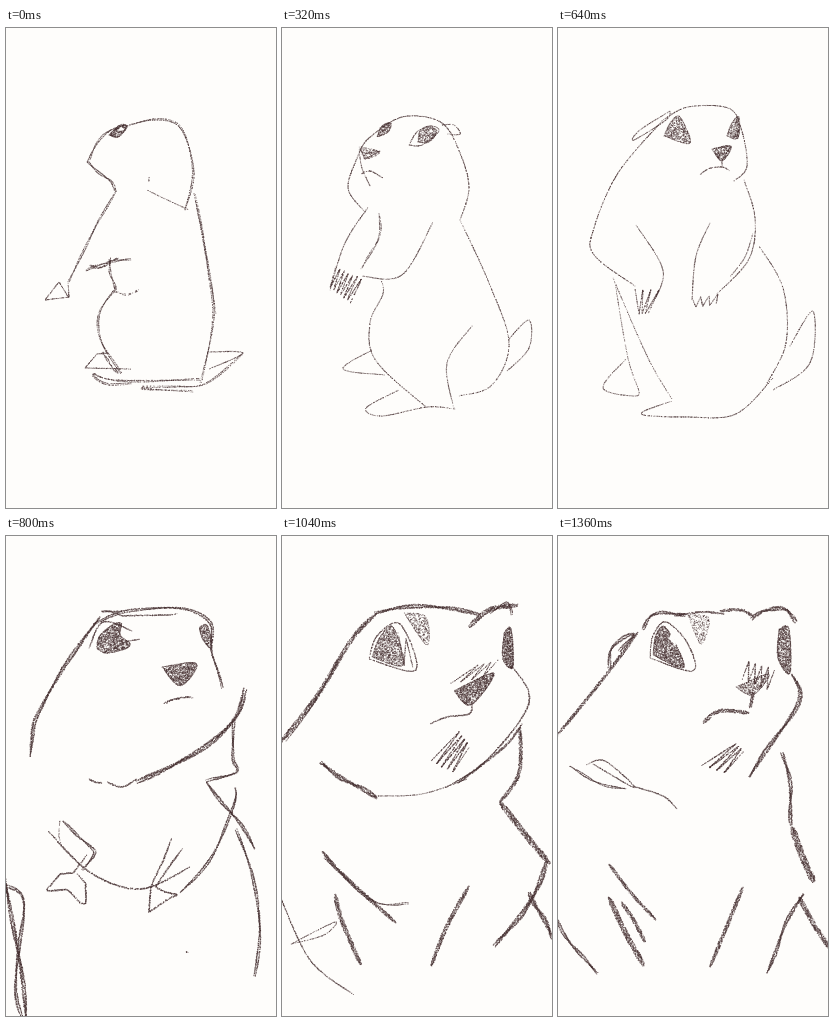
An HTML page with a canvas that plays this animation: 270x480 px, repeating every 1.44 s.

```html
<!DOCTYPE html>
<html lang="en">
<head>
<meta charset="utf-8">
<title>Prairie dog turns</title>
<style>
html, body { margin: 0; height: 100%; overflow: hidden; background: #fefdfb; }
canvas { display: block; width: 100vw; height: 100vh; }
</style>
</head>
<body>
<canvas id="stage" width="270" height="480"></canvas>
<script>
const PAPER = '#fefdfb', INK = '#452f30';
const STEP = 80, STEPS = 18, SAMPLES = 90;
const CLOSED = 'ofw';

const stage = document.getElementById('stage');
const ctx = stage.getContext('2d');

// Each stroke: a tag, then a few x,y points.
// s smooth, d smooth drawn twice, l straight, o closed outline (number = width);
// f shaded shape (number = density), w blank shape;
// z zigzag between two edges, given as start and end of each (width/turns).
const profile = {
  head: 'd.9 119,98 150,92 175,101 188,145 179,182',
  face: 'd1 121,97 105,102 91,116 81,134',
  mouth: 'd1.2 81,134 88,140 104,153 109,164',
  eyeR: 'f1.9 103,107 114,97 121,99 112,109',
  glint: 'w1 112,103 115,99 118,102',
  armL: 'd.9 110,163 93,191 80,220 62,254',
  pawL: 'l1 62,255 63,270 53,254 39,272 63,269',
  collar: 's.6 139,161 155,169 183,182',
  mark: 's.6 143,145 143,154',
  back: 'd.8 188,165 201,235 208,290 194,355',
  back2: 's.8 190,174 203,240 210,287',
  armR: 'd1 80,243 105,233 125,232',
  fold: 'd1 84,237 97,239 112,229',
  fold2: 'd1 103,230 105,245 109,262',
  belly: 'd.9 110,259 94,285 96,315 115,346',
  smudge: 'd.4 105,263 120,266 133,263',
  footL: 'l1 102,325 91,326 79,340 125,341',
  toe: 'd1 97,324 102,334 113,345',
  sole: 'd.9 125,355 100,355 87,346 110,352 194,352',
  hem: 'd.7 187,364 135,360 170,359 200,355 236,326',
  tail: 's1 201,324 237,325 203,341'
};
const left = {
  head: 's1 98,100 125,88 160,95 178,125 187,160 178,192',
  face: 's1 108,94 85,112 76,128 66,160 82,183',
  face2: 's.8 77,121 80,140 88,158',
  eyeL: 'f1.4 95,109 100,98 109,95 106,104',
  eyeR: 'f1.2 136,114 138,103 146,99 155,103 147,114',
  lid: 'o.9 127,117 135,104 148,98 157,103 140,117',
  glint: 'w1 147,104 149,101 151,104',
  ear: 's.8 160,97 172,97 178,106 165,106',
  nose: 'f.7 79,119 83,131 98,124',
  stem: 'l1 77,118 83,131 98,123 81,126',
  mouth: 's1.1 79,146 88,143 101,150',
  armL: 's.9 87,178 63,215 48,262',
  armIn: 'd.8 97,185 96,212 79,241',
  pawL: 'z1/7 54,238 80,250 48,260 68,276',
  armR: 's.8 80,248 120,247 151,194',
  belly: 's.8 99,252 101,266 88,295 94,333 144,379',
  back: 's.8 178,192 207,255 227,315 210,357 177,368',
  thigh: 's.8 190,298 165,335 172,381',
  footL: 's.8 90,322 61,341 103,347',
  foot: 's.8 117,362 84,380 100,388 145,379 173,381',
  tail: 's.8 226,312 247,292 247,320 224,344'
};
const right = {
  head: 's.9 105,92 130,79 170,80 183,100 189,138 176,153',
  face: 's.9 105,92 60,145 36,200 36,227 77,258',
  ear: 'o.9 112,83 82,102 76,112 108,92',
  eyeL: 'f1.1 106,108 113,94 122,89 132,115',
  eyeR: 'f1.3 169,108 174,95 181,89 180,110',
  nose: 'f1.3 154,121 173,118 164,133',
  stem: 'l.9 154,121 173,118 164,133 164,140',
  mouth: 's1.1 142,147 150,141 164,139 172,143',
  side: 's.9 186,152 197,190 191,231 159,266',
  side2: 's.7 195,205 187,229 172,249',
  armR: 's.9 134,272 138,228 152,195',
  armIn: 's.9 78,197 105,242 95,275',
  pawL: 'z.9/4 77,260 101,262 81,286 90,286',
  pawR: 'z.9/4 134,270 160,266 138,279 158,277',
  flank: 's.5 57,255 70,330 81,362',
  belly: 's.6 55,250 90,330 114,371',
  footL: 's.7 68,331 45,360 78,368 80,360',
  foot: 's.9 114,373 83,386 130,389 178,386 215,350',
  back: 's.8 201,218 225,260 228,315 208,357',
  tail: 's.8 232,318 255,283 252,335 215,362'
};
const close = {
  head: 'd2 78,86 115,72 180,69 214,80 214,113 238,152',
  ear: 's1.8 118,71 95,67 130,63 201,75',
  face: 'd3 88,75 65,115 35,155 -2,202',
  eyeL: 'f1.8 83,115 86,100 110,84 107,98 120,107 95,120',
  lidL: 's1.6 83,112 97,86 126,95',
  lash: 's1 108,113 120,106 135,103',
  eyeR: 'f1.6 205,82 216,84 217,120 206,102',
  nose: 'f1.8 157,136 196,131 197,142 178,158',
  mouth: 's2.5 166,178 180,174 195,171',
  jawR: 'd3 238,152 228,183 195,215 130,245',
  jawL: 's1.8 83,243 89,246 96,247',
  chin: 's1.8 101,246 116,251 131,243',
  neck: 'd1.8 229,184 226,222 230,236 200,246',
  shoulder: 'd2 200,246 230,283 249,313',
  side: 'd2 250,301 247,317 205,375 182,402',
  back: 'd2.2 243,331 263,400 268,482',
  chest: 's1.8 42,295 85,337 135,353 184,331',
  faint: 's.5 54,283 53,300 57,314',
  armIn: 'd2 46,329 60,341 82,350 66,363',
  pawL: 'l2.2 83,348 19,389 75,411 62,364',
  edge: 'd2.5 -2,342 10,400 20,482',
  edge2: 'd2 -2,350 18,368 9,450 15,482',
  pawR: 'l2.2 182,317 146,390 141,427 182,402 147,390 186,330',
  speck: 's2.4 180,416 182,417'
};
const near = {
  head: 'd2.5 93,78 135,69 198,79',
  ear: 's5 187,91 207,74 236,69',
  earTip: 'd1.2 208,78 225,66 229,79',
  face: 's4.6 95,77 70,103 35,160 -2,207',
  cheek: 's1.3 56,125 30,170 4,205',
  eyeL: 'f1.2 90,121 98,101 111,91 121,129',
  lidL: 'o1.2 87,123 95,100 118,88 134,134',
  lash: 'l1 116,96 122,130 124,102 131,132',
  brow: 'f.7 122,77 144,81 145,109',
  eyeR: 'f1.9 222,97 229,93 231,131 221,123',
  nose: 'f1.7 172,155 212,137 189,169',
  tuft: 'z.9/4 168,148 200,142 196,129 216,124',
  mouth: 's1.6 148,188 165,181 187,178 190,168',
  chin: 'z1.3/5 149,225 170,237 178,195 188,210',
  jawR: 's1.6 230,130 247,167 205,224 163,252',
  jawR2: 's2.5 240,188 222,211 176,247',
  jawL: 'd3 38,227 58,240 95,263',
  under: 's.8 92,260 140,258 185,243',
  neck: 's4 238,191 237,237 218,266',
  shoulder: 's6 218,266 246,302 268,328',
  side: 'd3 266,325 254,356 213,411',
  back: 'd3 248,356 258,378 272,402',
  chest: 's4 40,315 60,338 114,387',
  chest2: 'd1 42,322 92,365 127,368',
  armIn: 's4.5 53,358 60,385 79,429',
  edge: 's1.3 -2,360 28,424 72,459',
  leaf: 'o.8 9,408 53,386 42,399',
  pawR: 's4.2 187,350 165,390 149,430'
};
const up = {
  head: 's4 121,78 150,75 197,81',
  ear: 'd2.6 194,84 208,74 226,72 237,87',
  earL: 'd2 84,93 95,79 127,78',
  face: 's4.2 91,90 55,130 -2,198',
  cheek: 'd1.4 55,108 74,100 88,91',
  eyeL: 'f1.7 95,119 98,99 108,92 126,131',
  glint: 'w1 111,103 114,97 118,109',
  lidL: 'o1.3 92,122 95,100 108,86 130,108 135,135',
  brow: 'f.8 128,79 151,82 146,109',
  eyeR: 'f1.6 221,93 231,93 232,137 220,122',
  nose: 'f.8 181,145 191,125 216,130 197,157',
  tuft: 'z1.2/5 184,144 209,154 191,125 217,133',
  stem: 's3.5 195,156 194,163 192,172',
  mouth: 's4.4 136,187 155,178 191,175',
  chin: 'z2/4 146,232 170,238 178,208 186,212',
  jawR: 's4 235,140 235,190 192,248',
  jawL: 'd1.2 12,230 35,245 68,253',
  jaw2: 'd1.5 35,228 56,242 98,268',
  under: 's1.4 43,224 67,240 123,278',
  neck: 'd3 222,212 235,270 240,290',
  shoulder: 's6.5 235,286 249,309 267,348',
  side: 'd2.4 258,345 220,400 203,440',
  back: 's5 249,368 257,386 272,412',
  chest: 'd1.1 50,325 75,357 109,386',
  armIn: 's5 54,358 62,390 80,430',
  edge: 's4 -2,374 15,401 42,433',
  pawR: 'd1.4 186,342 170,380 143,446'
};
const stare = {
  ...up,
  head: 's2.2 116,80 145,76 166,78',
  crown: 's3.2 162,75 183,74 196,81',
  face: 's3.4 80,96 48,139 -2,201',
  cheek: 'd2 50,132 54,112 76,98 62,116',
  brow: 'f.5 130,79 151,82 143,108',
  nose: 'f1 178,151 211,138 195,159',
  mouth: 's4 145,187 162,175 191,177',
  chin: 'z1.4/4 143,230 166,237 179,207 186,215',
  jawR: 'd2.7 234,138 239,168 191,241',
  jaw2: 's1.2 28,229 47,225 77,252 35,228',
  under: 's1.4 74,250 105,260 119,273',
  neck: 'd2.4 225,216 231,245 234,290',
  shoulder: 's7 234,291 243,317 256,346',
  side: 'd2.2 245,358 225,395 209,437',
  back: 's5 241,361 255,387 272,413',
  chest: 's3.4 51,328 73,357 98,384',
  armIn: 's5.5 51,361 66,394 86,430',
  armIn2: 's4 63,366 75,383 87,406',
  edge: 'd2 -2,381 15,411 40,437',
  pawR: 's4 185,351 169,390 152,431'
};

const mix = (a, b, k) => a + (b - a) * k;
const mixPoint = (p, q, k) => [mix(p[0], q[0], k), mix(p[1], q[1], k)];

function smooth(pts) {
  const out = [pts[0]], last = pts.length - 1;
  for (let i = 0; i < last; i++) {
    const [a, b, c, d] = [pts[Math.max(0, i - 1)], pts[i], pts[i + 1], pts[Math.min(last, i + 2)]];
    for (let t = .1; t < 1.01; t += .1) {
      out.push([0, 1].map(n => b[n] + t / 2 * (c[n] - a[n] +
        t * (2 * a[n] - 5 * b[n] + 4 * c[n] - d[n] + t * (3 * (b[n] - c[n]) + d[n] - a[n])))));
    }
  }
  return out;
}

function zigzag([a, b, c, d], turns) {
  const out = [];
  for (let i = 0; i < turns; i++) {
    const k = i / (turns - 1);
    out.push(mixPoint(a, b, k), mixPoint(c, d, k));
  }
  return out;
}

// Even spacing lets any two strokes blend point by point.
function resample(pts) {
  const dist = [0];
  for (let i = 1; i < pts.length; i++) {
    dist.push(dist[i - 1] + Math.hypot(pts[i][0] - pts[i - 1][0], pts[i][1] - pts[i - 1][1]));
  }
  const total = dist[dist.length - 1], out = [];
  for (let n = 0, i = 1; n <= SAMPLES; n++) {
    const d = total * n / SAMPLES;
    while (i < pts.length - 1 && dist[i] < d) i++;
    const k = Math.min(1, (d - dist[i - 1]) / (dist[i] - dist[i - 1] || 1));
    out.push(mixPoint(pts[i - 1], pts[i], k));
  }
  return out;
}

function parse(spec) {
  const [tag, ...rest] = spec.split(' ');
  const kind = tag[0], [size, turns] = tag.slice(1).split('/').map(Number);
  let pts = rest.map(p => p.split(',').map(Number));
  if (CLOSED.includes(kind)) pts.push(pts[0]);
  if (kind === 'z') pts = zigzag(pts, turns);
  else if (kind !== 'l') pts = smooth(pts);
  return { kind, size, pts: resample(pts) };
}

function seeded(seed) {
  return () => {
    seed = seed + 0x6D2B79F5 | 0;
    let t = Math.imul(seed ^ seed >>> 15, 1 | seed);
    t = t + Math.imul(t ^ t >>> 7, 61 | t) ^ t;
    return ((t ^ t >>> 14) >>> 0) / 4294967296;
  };
}

function dot(x, y, rnd) {
  ctx.globalAlpha = .4 + .45 * rnd();
  ctx.fillRect(x - .45, y - .45, .9, .9);
}

function pencil(pts, width, rnd, sway = 0) {
  const phase = rnd() * 6;
  for (let i = 1; i < pts.length; i++) {
    const [x0, y0] = pts[i - 1], dx = pts[i][0] - x0, dy = pts[i][1] - y0;
    const len = Math.hypot(dx, dy) || 1;
    const u = i / pts.length;
    const w = width * Math.min(1, .45 + 6 * Math.min(u, 1 - u));
    const bend = sway * Math.sin(phase + u * 7);
    const press = .85 + .2 * Math.sin(phase + u * 23);
    for (let n = len * 2 * w * press + rnd(); n >= 1; n--) {
      const k = rnd(), off = bend + (rnd() - .5) * Math.max(.4, w - .5);
      dot(x0 + dx * k - dy / len * off, y0 + dy * k + dx / len * off, rnd);
    }
  }
}

function shade(pts, density, blank, rnd) {
  const shape = new Path2D();
  pts.forEach(([x, y]) => shape.lineTo(x, y));
  if (blank) {
    ctx.globalAlpha = 1;
    ctx.fillStyle = PAPER;
    ctx.fill(shape);
    ctx.fillStyle = INK;
    return;
  }
  const xs = pts.map(p => p[0]), ys = pts.map(p => p[1]);
  const x = Math.min(...xs), y = Math.min(...ys);
  const w = Math.max(...xs) - x, h = Math.max(...ys) - y;
  ctx.save();
  ctx.clip(shape);
  for (let n = w * h * density; n > 0; n--) dot(x + rnd() * w, y + rnd() * h, rnd);
  ctx.restore();
  pencil(pts, density * .6, rnd);
}

function drawStroke({ kind, size, pts }, rnd) {
  if (kind === 'f' || kind === 'w') return shade(pts, size, kind === 'w', rnd);
  pencil(pts, size, rnd);
  if (kind === 'd') pencil(pts, size * .8, rnd, 1 + size * .6);
}

// A stroke found in only one pose stays with the nearer one.
function blend(a, b, k) {
  if (!a || !b) return k < .5 ? a : b;
  return {
    kind: (k < .5 ? a : b).kind,
    size: mix(a.size, b.size, k),
    pts: a.pts.map((p, i) => mixPoint(p, b.pts[i], k))
  };
}

const keys = [[1, profile], [4, left], [8, right], [11, close], [13, near], [15, up], [17, stare]]
  .map(([at, pose]) => ({
    at,
    pose: Object.fromEntries(Object.entries(pose).map(([name, spec]) => [name, parse(spec)]))
  }));

function draw(step) {
  const at = Math.max(step, 1);
  const next = keys.findIndex((key, i) => i && key.at >= at);
  const a = keys[next - 1], b = keys[next];
  const k = (at - a.at) / (b.at - a.at);
  const rnd = seeded(at * 977);
  ctx.globalAlpha = 1;
  ctx.fillStyle = PAPER;
  ctx.fillRect(0, 0, stage.width, stage.height);
  ctx.fillStyle = INK;
  for (const name in { ...a.pose, ...b.pose }) {
    const stroke = blend(a.pose[name], b.pose[name], k);
    if (stroke) drawStroke(stroke, rnd);
  }
}

let shown = -1;
function tick() {
  const step = Math.floor(performance.now() / STEP) % STEPS;
  if (step !== shown) draw(shown = step);
  requestAnimationFrame(tick);
}
tick();
</script>
</body>
</html>
```
